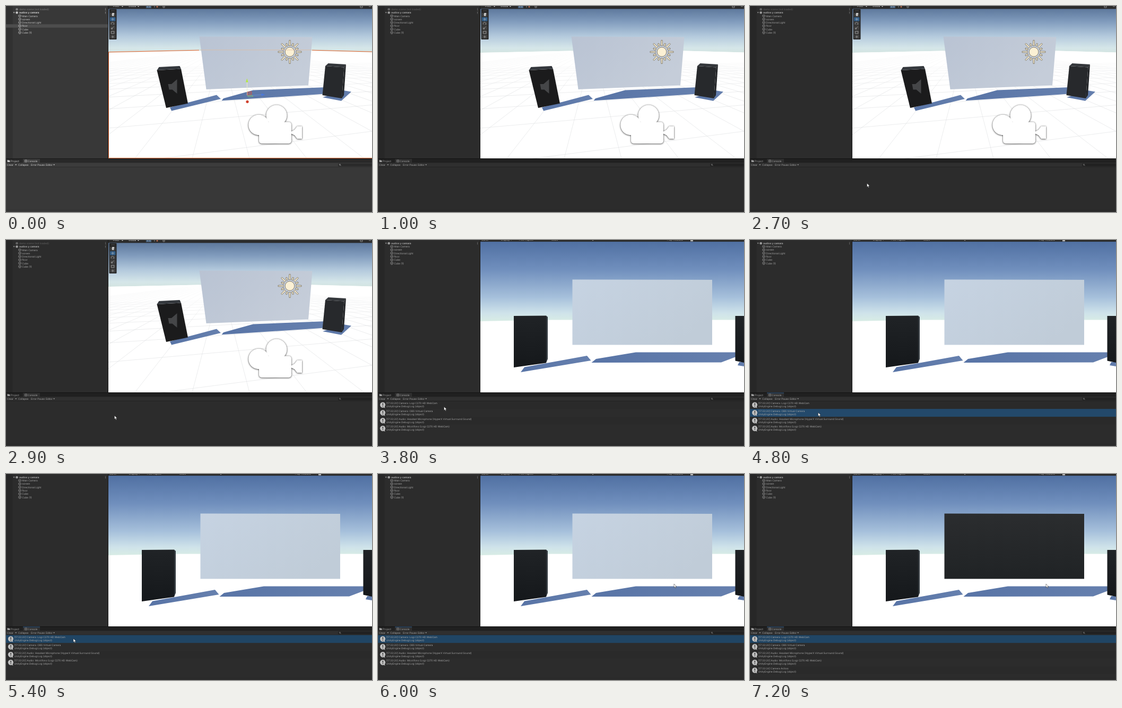
Animation of 690x388 px, one loop 8000 ms. Source, as an HTML page:

```html
<!DOCTYPE html>
<html lang="en">
<head>
<meta charset="utf-8">
<title>Editor play mode</title>
<style>
  html, body { margin: 0; width: 100%; height: 100%; overflow: hidden; background: #282828; }
  svg { display: block; width: 100%; height: 100%; }
  text { font: 4.73px Inter, Roboto, sans-serif; fill: #d2d2d2; text-rendering: geometricPrecision; }
  .bold { font-weight: 600; fill: #e8e8e8; }
  .dim { fill: #7c7c7c; }
  .icon { fill: none; stroke: #c4c4c4; stroke-width: .6; }
</style>
</head>
<body>
<svg viewBox="0 0 690 388">
  <defs>
    <linearGradient id="skyA" x2="0" y2="1">
      <stop offset="0" stop-color="#5d789c"/><stop offset=".3" stop-color="#829dbe"/>
      <stop offset=".62" stop-color="#b4cadd"/><stop offset=".88" stop-color="#d5e6e9"/>
      <stop offset="1" stop-color="#d3e4e0"/>
    </linearGradient>
    <linearGradient id="skyB" x2="0" y2="1">
      <stop offset="0" stop-color="#5070a2"/><stop offset=".35" stop-color="#708fbd"/>
      <stop offset=".7" stop-color="#a6c0db"/><stop offset=".9" stop-color="#cfe3ea"/>
      <stop offset="1" stop-color="#d8ece5"/>
    </linearGradient>
    <linearGradient id="haze" x2="0" y2="1">
      <stop offset="0" stop-color="#fff"/><stop offset="1" stop-color="#fff" stop-opacity="0"/>
    </linearGradient>
    <linearGradient id="panel" x2="1" y2=".5">
      <stop offset="0" stop-color="#b9c3d3"/><stop offset="1" stop-color="#c5cdd9"/>
    </linearGradient>
    <linearGradient id="wall" x2="1" y2=".6">
      <stop offset="0" stop-color="#c6d3e2"/><stop offset="1" stop-color="#c0ccd8"/>
    </linearGradient>
    <linearGradient id="wallOff" x2="0" y2="1">
      <stop offset="0" stop-color="#2b2d2f"/><stop offset="1" stop-color="#202325"/>
    </linearGradient>
    <linearGradient id="box" x2="0" y2="1">
      <stop offset="0" stop-color="#202326"/><stop offset="1" stop-color="#15181b"/>
    </linearGradient>
    <linearGradient id="shade" x2="1" y2="0">
      <stop offset="0" stop-color="#5874a6"/><stop offset="1" stop-color="#6680ae"/>
    </linearGradient>
    <filter id="soft" x="-20%" y="-20%" width="140%" height="140%" color-interpolation-filters="sRGB">
      <feDropShadow dx="0" dy=".6" stdDeviation="1.8" flood-color="#000" flood-opacity=".85"/>
    </filter>
    <clipPath id="view"><rect x="193" y="0" width="497" height="287"/></clipPath>
  </defs>

  <!-- panels -->
  <rect width="690" height="388" fill="#383838"/>
  <rect width="12.5" height="287" fill="#313131"/>
  <g id="tree"></g>
  <rect y="287" width="690" height="1" fill="#191919"/>
  <rect y="288" width="690" height="7.5" fill="#282828"/>
  <rect x="32" y="288" width="32" height="7.5" fill="#3c3c3c"/>
  <rect id="focus" x="32" y="287.6" width="32" height=".9" fill="#3a79bb"/>
  <rect y="295.5" width="690" height="7.3" fill="#3c3c3c"/>
  <rect y="302.8" width="690" height=".6" fill="#232323"/>
  <path d="M2.5 290h2l.6.8h2.4v3.2h-5z" fill="#c4c4c4"/>
  <path d="M35.5 290h4v4h-4zM36.5 291.2h2M36.5 292.6h2" class="icon"/>
  <text x="9" y="293.5">Project</text>
  <text x="41" y="293.5">Console</text>
  <text x="2" y="300.8">Clear</text>
  <text x="23" y="300.8">Collapse</text>
  <text x="47" y="300.8">Error Pause</text>
  <text x="75" y="300.8">Editor</text>
  <path d="M17 298.3h3.4l-1.7 2zM89 298.3h3.2l-1.6 2z" fill="#c4c4c4"/>
  <rect x="626" y="296.6" width="66" height="5.4" rx="1.5" fill="#2a2a2a"/>
  <circle cx="629.4" cy="298.8" r="1.1" class="icon"/>
  <path d="M630.2 299.6l1.4 1.4" class="icon"/>
  <g id="logs"></g>
  <rect y="384" width="690" height=".6" fill="#2c2c2c"/>
  <rect id="tint" width="690" height="388" fill="#000" opacity=".21"/>

  <!-- editor view -->
  <g id="editor" clip-path="url(#view)">
    <rect x="193" y="5" width="497" height="84" fill="url(#skyA)"/>
    <path d="M193 88L364 84.5H577L690 87.5V287H193z" fill="#fff"/>
    <g id="grid" stroke="#d6d8db" stroke-width=".5"></g>
    <path d="M193 88L364 84.5H577L690 87.5V165H193z" fill="url(#haze)"/>
    <g fill="url(#shade)">
      <path d="M309 191L397 167.5L405 175L312 197.5z"/>
      <path d="M406.5 178.2L410 174L466 158.5L604 153L600 165.5L580 167z"/>
      <path d="M597 172L632 178.8L651 161.5L636 159z"/>
    </g>
    <path d="M364.5 57.5L577.5 58.5L570 149.5L377.5 157z" fill="url(#panel)"/>
    <path d="M284.5 121L330 118.5L343 183.5L302 192z" fill="#1b1b1c"/>
    <path d="M284.5 121L288.5 115L327.5 113L330 118.5z" fill="#34383d"/>
    <path d="M305.5 147h6.5l10.5-9v27l-9-7.5h-6z" fill="#454648"/>
    <path d="M602 113L637.5 115.5L633 174L596.5 168z" fill="#27292c"/>
    <path d="M602 113L607.5 108L641 110L637.5 115.5z" fill="#34373b"/>
    <path d="M637.5 115.5L641 110L637 168L633 174z" fill="#242629"/>
    <g id="sun" fill="#fbf0d4" stroke="#6f6857" stroke-width=".8"></g>
    <g fill="#fff" filter="url(#soft)">
      <circle cx="476.5" cy="224" r="19.3"/><circle cx="510" cy="206" r="19.5"/>
      <rect x="477" y="218.5" width="61" height="40.5" rx="5"/>
      <path d="M537 237L544 233L549 226.5H558V250H549L544 243.5L537 240z"/>
    </g>
    <rect x="193" width="497" height="5.5" fill="#2b2b2b"/>
    <text x="202" y="1.8">Pivot</text><text x="231" y="1.8">Global</text>
    <path d="M218 0h3l-1.5 2zM248 0h3l-1.5 2z" fill="#c4c4c4"/>
    <path d="M280 0v3M296 0h3v3h-3zM668 0h4v3h-4zM684 1h4" class="icon"/>
    <rect x="264" width="10" height="4" fill="#46607c"/>
    <path d="M267 0v3M271 0v3" class="icon"/>
    <circle cx="285" cy="1.5" r="1.5" fill="#b56a4d"/>
    <rect x="194.5" y="6" width="14" height="57" rx="1" fill="#262626"/>
    <g id="tools"></g>
    <path d="M198 9h7" class="icon" stroke-opacity=".4"/>
    <path d="M199 15.5l1.5 3.5h2.5l1-4.5v-1.5h-4v3z" fill="#c4c4c4"/>
    <path d="M198.5 25h5.5M201.2 22.2v5.6M198.6 34.5a2.6 2.6 0 1 1 3.5 1M198.6 43.5v-2h2v2zM200.6 41.5l3-3M198.7 47.5h5v4.5h-5zM198.7 58h5M201.2 55.5v5" class="icon"/>
    <g id="picked" fill="none">
      <path d="M364 83.2L193.5 86.8V286.4H690M577 83.2L690 86.2" stroke="#ea642c"/>
      <path d="M366 82.8H576" stroke="#dfbda2" stroke-width=".8"/>
      <path d="M454.5 168V144" stroke="#e4eccb"/>
      <path d="M455 169L482 167" stroke="#6f93dc" stroke-width=".7"/>
      <path d="M455 162l8-1v6l-8 1z" fill="#d8523a55" stroke="#d8523a" stroke-width=".7"/>
      <path d="M455 169l8-1 3 2-9 1z" stroke="#8fd84a" stroke-width=".6"/>
      <path d="M452 143.5L454.3 136.5L456.6 143.5z" fill="#b4ea3c"/>
      <path d="M481.5 164.5L488.5 167L481.5 169.5z" fill="#4a78dc"/>
      <circle cx="455" cy="180.3" r="2.6" fill="#d0402c"/>
    </g>
  </g>

  <!-- running view -->
  <g id="game" clip-path="url(#view)">
    <rect x="193" width="497" height="287" fill="#fff"/>
    <rect x="193" y="3" width="497" height="150" fill="url(#skyB)"/>
    <path d="M193 153L330 150.5H690V160H193z" fill="#fff"/>
    <g fill="url(#shade)">
      <path d="M269 249L276 239.5L394 218L401.5 227z"/>
      <path d="M402.5 231L411 224L486 211.5H680V218L647 230.5z"/>
      <path d="M678 236L681 230H690V238z"/>
    </g>
    <path id="screen" d="M366.5 74.5L630 75V197.5H366.5z"/>
    <path d="M256 143L317 142.5V231.5L256 240z" fill="url(#box)"/>
    <path d="M317 142.5L320 145V224L317 231.5z" fill="#32383d"/>
    <path d="M673.5 143H690V231L673.5 227.5z" fill="url(#box)"/>
    <rect x="193" width="497" height="3.2" fill="#2b2b2b"/>
    <text x="195" y="1.3">Game</text><text x="232" y="1.3">Display 1</text>
    <text x="266" y="1.3">Free Aspect</text><text x="327" y="1.3">Scale</text>
    <text x="545" y="1.3">Play Focused</text>
    <circle cx="405" r="1.3" fill="#8c8c8c"/><rect x="589" width="5" height="2.5" fill="#b4b4b4"/>
  </g>
  <rect x="192" width="1" height="287" fill="#191919"/>
  <path id="cursor" d="M0 0V6.8L1.6 5.4L2.7 8L3.9 7.5L2.8 5H5z" fill="#fff" stroke="#222" stroke-width=".5"/>
</svg>
<script>
const LOOP = 8000, STEP = 100, ROW = 14.75;
const DESELECT = 500, PLAY = 1000, START = 3000, ACTIVE = 6900;
const el = id => document.getElementById(id);
const show = (node, on) => node.setAttribute('display', on ? 'inline' : 'none');
const repeat = (n, draw) => Array.from({ length: n }, (_, i) => draw(i)).join('');

// hierarchy
const cube = y => `<path class="icon" d="M26 ${y - 2.6}l2.3 1.3v2.6l-2.3 1.3l-2.3-1.3v-2.6zM23.7 ${y - 1.3}l2.3 1.3l2.3-1.3M26 ${y}v2.6"/>`;
const sceneIcon = y => `<circle cx="20.5" cy="${y}" r="2.3" fill="#c4c4c4"/>`;
const dots = y => repeat(3, i => `<circle cx="187.5" cy="${y + (i - 1) * 1.6}" r=".5" fill="#c4c4c4"/>`);
const objects = ['Main Camera', 'screen', 'Directional Light', 'floor', 'Cube', 'Cube (1)'];
el('tree').innerHTML = `
  <g id="closed"><g opacity=".5">${sceneIcon(6.2)}</g>
    <text class="dim" x="25" y="7.9">demo scene (not loaded)</text>${dots(6.2)}</g>
  <g id="list">
    <path d="M13.5 11.6h3.2l-1.6 2.2z" fill="#c4c4c4"/>${sceneIcon(12.5)}${dots(12.5)}
    <text class="bold" x="25" y="14.2">audios y camara</text>
    <rect id="floorRow" y="34.4" width="192" height="6.3" fill="#4d4d4d"/>
    ${objects.map((name, i) => {
      const y = 18.8 + i * 6.27;
      return cube(y) + `<text x="30.2" y="${y + 1.7}">${name}</text>`;
    }).join('')}
  </g>`;

// console
const messages = [
  '[17:33:20] Camera: Logi C270 HD WebCam',
  '[17:33:20] Camera: OBS Virtual Camera',
  '[17:33:20] Audio: Headset Microphone (HyperX Virtual Surround Sound)',
  '[17:33:20] Audio: Micrófono (Logi C270 HD WebCam)',
  '[17:33:24] Camera Activa:'
];
el('logs').innerHTML = `<rect id="selected" width="690" height="${ROW}" fill="#2c5d87"/>` +
  messages.map((line, i) => {
    const y = 303.4 + i * ROW;
    return `<g class="log">
      <rect y="${y}" width="690" height="${ROW}" fill="#000" opacity="${i % 2 ? 0 : .06}"/>
      <path d="M9 ${y + 2}a5.2 5.2 0 1 0 2 10l2.4 1l-.7-2.4a5.2 5.2 0 0 0-3.7-8.6z" fill="#f2f2f2"/>
      <path d="M8.3 ${y + 4}h1.6l-.3 4h-1zM8.4 ${y + 9}h1.4v1.4h-1.4z" fill="#333"/>
      <text x="15.6" y="${y + 5.8}">${line}</text>
      <text x="15.6" y="${y + 11.8}">UnityEngine.Debug:Log (object)</text>
    </g>`;
  }).join('');
const logs = [...document.querySelectorAll('.log')];

// floor lines meet at two vanishing points
el('grid').innerHTML =
  repeat(31, i => `<path d="M405 80L${405 + (i - 15.5) * 120} 310"/>`) +
  repeat(11, i => `<path d="M1900 80L193 ${80 + 330 / (1.5 + i * .7)}"/>`);

el('tools').innerHTML = repeat(6, i =>
  `<rect x="196" y="${13 + i * 8.2}" width="10.5" height="7.4" fill="${i === 1 ? '#35608a' : '#3f3f3f'}"/>`);

el('sun').innerHTML = repeat(16, i => {
  const tip = i % 2 ? 17 : 22;
  return `<path transform="translate(535 86.5) rotate(${i * 22.5})" d="M-1.5 -12L-1.1 -${tip}H1.1L1.5 -12z"/>`;
}) + '<circle cx="535" cy="86.5" r="8.8"/>';

// pointer stops: time, x, y
const stops = [
  [1300, 476, 31], [1400, 432, 118], [1500, 377, 232], [1600, 357, 272], [1700, 357, 272],
  [1900, 262, 301], [2000, 233, 307], [2300, 233, 307], [2700, 220.5, 334], [2800, 220.5, 334],
  [3400, 124.5, 314], [4100, 124.5, 314], [4600, 128.5, 325], [4800, 128.5, 325],
  [5400, 127, 310], [5500, 127, 310], [5600, 240, 285], [5700, 500, 190], [5800, 672, 128],
  [5900, 598, 188], [6000, 558, 207], [LOOP, 558, 207]
];
function pointer(t) {
  const i = stops.findIndex(s => s[0] > t);
  if (i < 1) return null;
  const [a, b] = [stops[i - 1], stops[i]];
  const k = (t - a[0]) / (b[0] - a[0]);
  return [a[1] + (b[1] - a[1]) * k, a[2] + (b[2] - a[2]) * k];
}

function render(t) {
  const running = t >= START;
  show(el('picked'), t < DESELECT);
  show(el('floorRow'), t < DESELECT);
  show(el('tint'), t >= PLAY);
  show(el('editor'), !running);
  show(el('game'), running);
  show(el('closed'), !running);
  el('list').setAttribute('transform', `translate(0 ${running ? -6.3 : 0})`);
  el('screen').setAttribute('fill', t >= ACTIVE ? 'url(#wallOff)' : 'url(#wall)');
  logs.forEach((log, i) => show(log, t >= (i < 4 ? START + 100 : ACTIVE)));

  const row = t >= 4800 && t < 5400 ? 1 : 0;
  show(el('selected'), t >= 4000);
  show(el('focus'), t >= 4000);
  el('selected').setAttribute('y', 303.4 + row * ROW);

  const p = pointer(t);
  show(el('cursor'), p);
  if (p) el('cursor').setAttribute('transform', `translate(${p})`);
}

function tick() {
  const t = performance.now() % LOOP;
  render(Math.floor(t / STEP) * STEP);
  requestAnimationFrame(tick);
}
tick();
</script>
</body>
</html>
```
